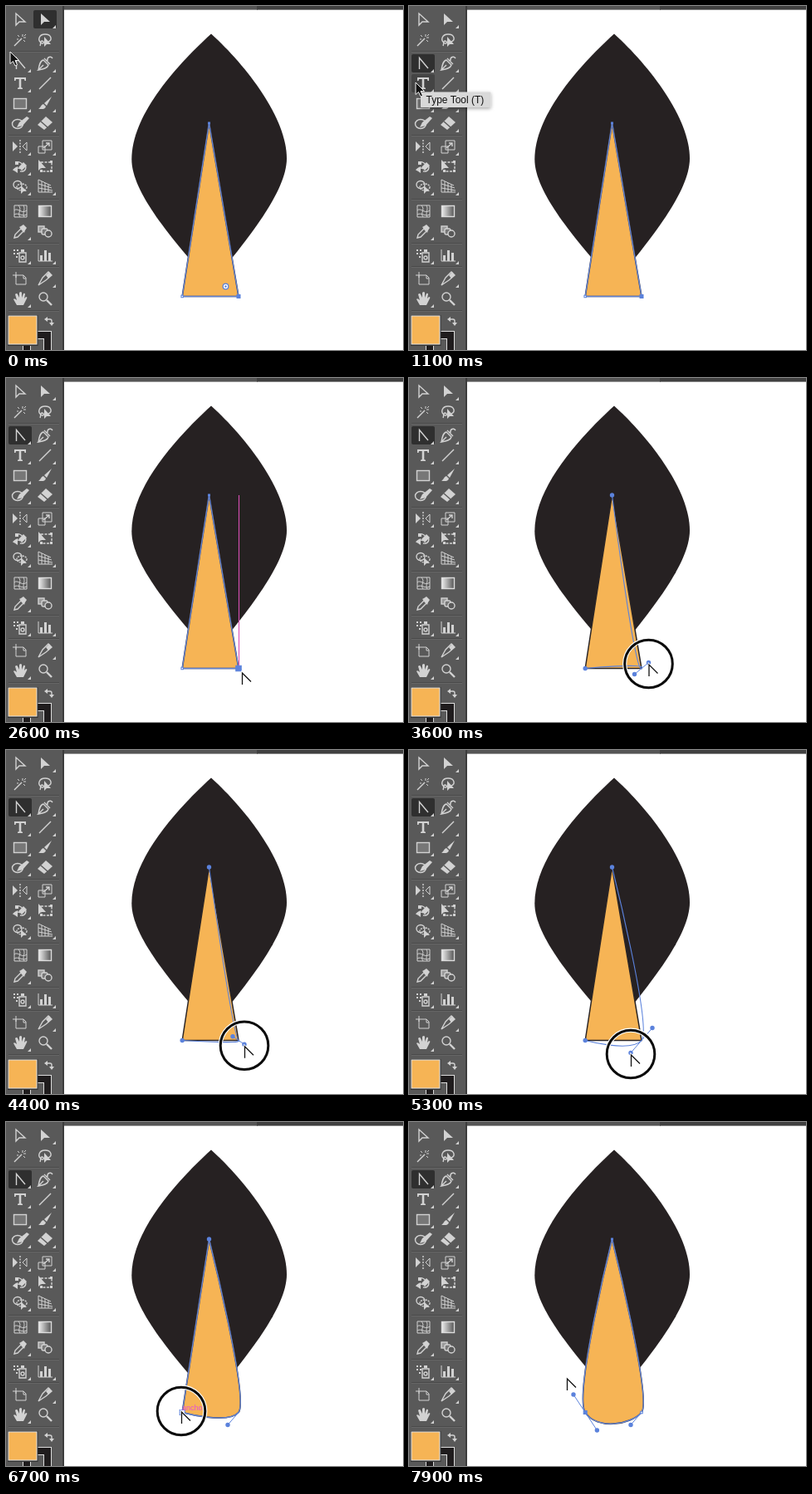
Write an HTML page that moves like this. It is 478x414 px and loops after 8 s.

```html
<!DOCTYPE html>
<html lang="en">
<head>
<meta charset="utf-8">
<title>Curving anchor points</title>
<style>
  html, body { margin: 0; width: 100%; height: 100%; overflow: hidden; background: #fff; }
  svg { display: block; }
  .icon { fill: none; stroke: #d2d2d2; stroke-width: 1.4; }
  .icon .f { fill: #d2d2d2; stroke: none; }
  .icon .thin { stroke-width: 1; }
  .tip { font: 12px "Liberation Sans", Arial, sans-serif; fill: #111; }
  .label { font: 9px "Liberation Sans", Arial, sans-serif; fill: #e34fd8; }
</style>
</head>
<body>
<svg width="478" height="414" viewBox="0 0 478 414">
  <defs>
    <linearGradient id="fade"><stop stop-color="#eee"/><stop offset="1" stop-color="#555"/></linearGradient>
    <filter id="shadow" x="-20%" y="-40%" width="140%" height="200%">
      <feDropShadow dx="0" dy="1.5" stdDeviation="2" flood-opacity=".35"/>
    </filter>
  </defs>
  <rect width="478" height="414" fill="#fff"/>
  <path fill="#262122" d="M247 33.5C290 72.5 338 135 338 183.5C338 223 291 281 247 334C200 281 151.3 224.5 151.3 184.5C151.3 133.5 200 76.5 247 33.5Z"/>
  <g id="art"></g>
  <rect width="303" height="4.6" fill="#555"/>
  <rect x="302" width="176" height="4.6" fill="#404040"/>
  <rect width="70" height="414" fill="#3c3c3c"/>
  <rect width="68" height="414" fill="#595959"/>
  <g id="bar"></g>
  <g id="mark"></g>
  <g id="icons"></g>
  <g id="swatch">
    <rect x="20.5" y="391.5" width="34" height="34" fill="#1f1c1d" stroke="#ddd"/>
    <rect x="29.5" y="400.5" width="16" height="16" fill="#595959" stroke="#ddd"/>
    <rect x="2" y="372" width="36.5" height="37" fill="#333"/>
    <rect x="3" y="373" width="34" height="34" fill="#f6b455" stroke="#e4e4e4"/>
    <path class="icon" d="M49 377H53Q55 377 55 379V382"/>
    <path fill="#d2d2d2" d="M46 377l4-3v6zM55 385l-3-4h6z"/>
  </g>
  <g id="over"></g>
</svg>
<script>
const LOOP = 8000, STEP = 100, BLUE = '#5b82dc';
const $ = id => document.getElementById(id);

// Tool icons around their own centre: [x, y, markup, has flyout]
const p = (d, c = '') => `<path class="${c}" d="${d}"/>`;
const f = d => p(d, 'f');
const arrow = 'M-5-7V7L-1 3H6Z';
const icons = [
  [17, 16, p(arrow)],
  [47, 16, f(arrow), 1],
  [17, 41, p('M-7 7L2-2') + p('M3-7V-4M7-3H4M-3-6L-1-4M7-7L5-5M6 2L4 0M-4-1H-2', 'thin')],
  [47, 41, p('M-4 4C-10 0-7-7 0-7C8-7 9 0 4 2M-4 4C-1 5-1 1-4 1C-6 2-5 5-6 7') + f('M-1-4V8L2 5H7Z')],
  [17, 69, p('M-4.5 7V-6.5L6 6'), 1],
  [47, 69, p('M-8 8C-7 2-6-3-2-4L4 2C3 6-2 7-8 8L-2 2M-1-6L6 1M3-3C2-8 7-9 9-6'), 1],
  [17, 93, f('M-7-7H7V-3H5.5L5-5H1.3V5L3 5.8V7H-3V5.8L-1.3 5V-5H-5L-5.5-3H-7Z'), 1],
  [47, 93, p('M-7 7L7-7'), 1],
  [17, 117, '<rect x="-7.5" y="-5.5" width="15" height="12" fill="#777"/>', 1],
  [47, 117, f('M8-8L-1 0L2 3ZM-2 1L1 4C0 8-4 7-8 7C-5 5-5 2-2 1Z'), 1],
  [17, 141, '<ellipse cx="-3" cy="1" rx="6.5" ry="5.5"/>' + f('M8-8L-1-1L-4 5L3 3L11-6Z'), 1],
  [47, 141, f('M-9 2L1-8L9-1L-1 8Z') + '<path stroke="#595959" d="M-5-2L3 5"/>', 1],
  [17, 169, f('M-9-6V6L-3 0Z') + p('M8-5V5L3 0Z', 'thin') + '<path stroke-dasharray="2 1.5" d="M0-8V8"/>', 1],
  [47, 169, p('M-3-7H8V4H-3ZM-8 0H0V8H-8Z', 'thin') + p('M-2 2L5-4M1-4H5V0'), 1],
  [17, 193, p('M-8 5C-4-3-1 6 2 1S-2-6-5-5M0 6C7 7 9 0 4-2') + f('M-9 4L-3 0L-3 8ZM-2 1L4-5L8-1L2 5ZM-6-6h4v4h-4z'), 1],
  [47, 193, '<rect x="-5" y="-5" width="13" height="11" stroke-dasharray="3 1.5"/>' + f('M-8-8V5L-5 2H1ZM6-7h3v3h-3zM6 4h3v3h-3zM-6 4h3v3h-3z')],
  [17, 217, '<ellipse cx="-3" cy="-2" rx="5" ry="4.5"/><ellipse cx="2" cy="1" rx="6" ry="4" stroke-dasharray="2 1"/>' + f('M1-1V9L4 6H8Z'), 1],
  [47, 217, p('M-8-8V7H9M-8-8L7-1M-8-3L8 2M-8 2L9 5M-4-6V7M0-4V7M4-2V7', 'thin'), 1],
  [17, 247, p('M-7-7H8V7H-7ZM-7-1C-3-5 2 4 8-1M-2-7C3-2-4 2 0 7M4-7C7-2 2 2 5 7M-7 4C-2 1 2 7 8 4', 'thin')],
  [47, 247, '<rect x="-7.5" y="-6.5" width="15" height="13" fill="url(#fade)" stroke="#ddd"/>'],
  [17, 271, p('M-7 8L-6 4L1-3L4 0L-3 7Z') + f('M-1-5L1-6L4-8L8-4L6-1L5 2Z'), 1],
  [47, 271, '<rect x="-8" y="-6" width="7" height="7" fill="#999"/><rect x="-4" y="-3" width="7" height="7" rx="2" fill="#777"/><circle cx="4" cy="3" r="4" fill="#595959"/>'],
  [17, 300, p('M-1-3H7V8H-1Z') + '<circle cx="3" cy="3" r="2"/>' + f('M1-7H5V-4H1ZM-4-7h2v2h-2zM-8-7h2v2h-2zM-4-3h2v2h-2zM-8-3h2v2h-2zM-5 1h2v2h-2z'), 1],
  [47, 300, p('M-8-7V7H9', 'thin') + f('M-6 0h3v7h-3zM-1-6h3v13h-3zM4-3h3v10h-3z'), 1],
  [17, 328, p('M-5-8V-1M-9-4H4L7-1V7H-5V-4M4-4V0H7', 'thin')],
  [47, 328, p('M-8 8L-3-1L4-8L8-4L1 2Z') + f('M1-4L5-8L8-4L4 0Z'), 1],
  [17, 352, f('M-4 8L-8 1Q-7-1-4 2L-6-5Q-4-7-3-5L-1-1L-1-7Q1-9 2-7L2-1L4-6Q6-7 6-5L5 0L7-2Q9-2 8 0L4 8Z'), 1],
  [47, 352, '<circle cx="-2" cy="-2" r="5"/><path stroke-width="2.4" d="M2 2L8 8"/>'],
];
$('icons').innerHTML = icons.map(([x, y, m, fly]) =>
  `<g class="icon" transform="translate(${x} ${y})">${m}${fly ? f('M13 7V11H9Z') : ''}</g>`).join('');
$('bar').innerHTML = [55, 156, 233, 286, 314, 367].map(y =>
  `<path stroke="#4a4a4a" d="M3 ${y - .5}H64"/><path stroke="#666" d="M3 ${y + .5}H64"/>`).join('');

// Pointer track: time, x, y
const track = [
  [0, 5, 55], [300, 5, 57], [600, 9, 70], [1000, 8, 92], [1200, 8, 92], [1400, 110, 300],
  [1500, 180, 375], [1700, 262, 372], [1800, 271, 362], [2000, 296, 350], [2300, 302, 356],
  [2500, 285, 354], [2600, 284, 354], [2700, 300, 354], [2800, 284, 351], [3000, 280.5, 350.5],
  [3200, 284, 351], [3600, 288.5, 344], [3900, 291, 348], [4300, 289, 355], [4700, 281, 358],
  [5000, 272, 364], [5300, 267, 366], [5500, 267, 366], [6100, 230, 350], [6500, 211, 348],
  [7000, 211, 348], [7100, 209, 345], [7400, 198, 329], [7700, 198, 329], [7800, 195, 319], [7900, 190, 308],
];
function pointer(t) {
  const i = track.findIndex(k => k[0] > t);
  if (i < 0) return track.at(-1).slice(1);
  const a = track[i - 1], b = track[i], u = (t - a[0]) / (b[0] - a[0]);
  return [1, 2].map(n => a[n] + (b[n] - a[n]) * u);
}

// The cone: top, right and left anchors; handles leave the last two
const TOP = [244.5, 141], RIGHT = [280, 349.5], LEFT = [212.2, 349.5];
const outR = [267, 364.5], outL = [198, 328];
const mirror = (h, a) => [2 * a[0] - h[0], 2 * a[1] - h[1]];
const rightSide = r => `M${TOP}C${TOP} ${mirror(r, RIGHT)} ${RIGHT}`;
const base = (r, l) => `C${r} ${mirror(l, LEFT)} ${LEFT}`;
const leftSide = l => `C${l} ${TOP} ${TOP}`;
const cone = (r, l) => rightSide(r) + base(r, l) + leftSide(l) + 'Z';

const line = (d, color, w) => `<path d="${d}" fill="none" stroke="${color}" stroke-width="${w}"/>`;
const dot = ([x, y]) => `<circle cx="${x}" cy="${y}" r="2.7" fill="${BLUE}"/>`;
const box = ([x, y], s, fill = '#fff') =>
  `<rect x="${x - s / 2}" y="${y - s / 2}" width="${s}" height="${s}" fill="${fill}" stroke="${BLUE}"/>`;
const handle = (a, h) => line(`M${a}L${h}`, BLUE, 1) + dot(h);
const body = (d, stroke, w) => `<path d="${d}" fill="#f6b455" stroke="${stroke}" stroke-width="${w}"/>`;

function art(t, pos) {
  const drag = [pos[0], pos[1] - 1.5];
  const flat = cone(RIGHT, LEFT), half = cone(outR, LEFT), full = cone(outR, outL);
  const done = d => body(d, '#4a4650', 1.7) + line(d, '#6283d2', 1.3);
  const pull = (from, to) => body(from, '#2a2526', 1.5) + line(to, BLUE, 1.1);
  if (t < 3000) {
    const near = t >= 2500 && t < 2700;
    return done(flat) + (near ? line('M280.5 141V349', '#d94fb4', 1.1) : '')
      + box(TOP, 2) + box(LEFT, 2.5) + box(RIGHT, near ? 6.5 : 4, BLUE)
      + (t < 500 ? `<circle cx="264.5" cy="337.5" r="3.3" fill="#fff" stroke="${BLUE}" stroke-width="1.3"/><circle cx="264.5" cy="337.5" r="1.2" fill="${BLUE}"/>` : '');
  }
  if (t < 5400) return pull(flat, rightSide(drag) + base(drag, LEFT)) + dot(TOP) + dot(LEFT)
    + handle(RIGHT, drag) + handle(RIGHT, mirror(drag, RIGHT));
  if (t < 6600) return done(half) + box(TOP, 2) + box(LEFT, t >= 6400 ? 6 : 2.5)
    + handle(RIGHT, outR) + handle(RIGHT, mirror(outR, RIGHT)) + box(RIGHT, 4, BLUE);
  if (t < 7100) return done(half) + dot(TOP) + handle(RIGHT, outR) + box(LEFT, 6)
    + (t < 7000 ? '<text class="label" x="212" y="347">anchor</text>' : '');
  const ends = h => handle(RIGHT, outR) + handle(LEFT, h) + handle(LEFT, mirror(h, LEFT));
  if (t < 7800) return pull(half, `M${RIGHT}` + base(outR, drag) + leftSide(drag)) + dot(TOP) + ends(drag);
  return done(full) + box(TOP, 2) + ends(outL) + box(RIGHT, 2.5) + box(LEFT, 4, BLUE);
}

function over(t, [x, y]) {
  const at = m => `<g transform="translate(${x} ${y})">${m}</g>`;
  if (t < 1300) {
    const tip = t < 1000 ? '' : '<rect x="14" y="103.5" width="84.5" height="18.5" rx="1" fill="#d9d9d9" filter="url(#shadow)"/><text class="tip" x="20.5" y="117">Type Tool (T)</text>';
    return tip + at('<path d="M0 0V14.5L3.5 11.5L6 17L8.5 16L6 10.5H10.5Z" fill="#111" stroke="#eee"/>');
  }
  const down = t >= 3000 && t < 5400 || t >= 6600 && t < 7800;
  const ring = '<circle r="28.8" fill="none" stroke="#fff" stroke-width="5.2"/><circle r="28.8" fill="none" stroke="#0b0b0b" stroke-width="3"/>';
  const hook = 'M.5 15V1L11 11.5';
  return at((down ? ring : '') + line(hook, '#fff', 2.6) + line(hook, '#111', 1.3));
}

function mark(t) {
  const tile = (x, y, c) => `<rect x="${x}" y="${y}" width="28" height="22" rx="2" fill="${c}"/>`;
  return (t < 500 ? tile(33, 5, '#2f2f2f') : tile(3, 58, '#2f2f2f'))
    + (t >= 1000 && t < 1300 ? tile(3, 82, '#444') : '');
}

let last = -1;
function draw(now) {
  const t = Math.floor(now % LOOP / STEP) * STEP;
  if (t !== last) {
    last = t;
    const pos = pointer(t);
    $('art').innerHTML = art(t, pos);
    $('mark').innerHTML = mark(t);
    $('over').innerHTML = over(t, pos);
  }
  requestAnimationFrame(draw);
}
draw(0);
</script>
</body>
</html>
```
